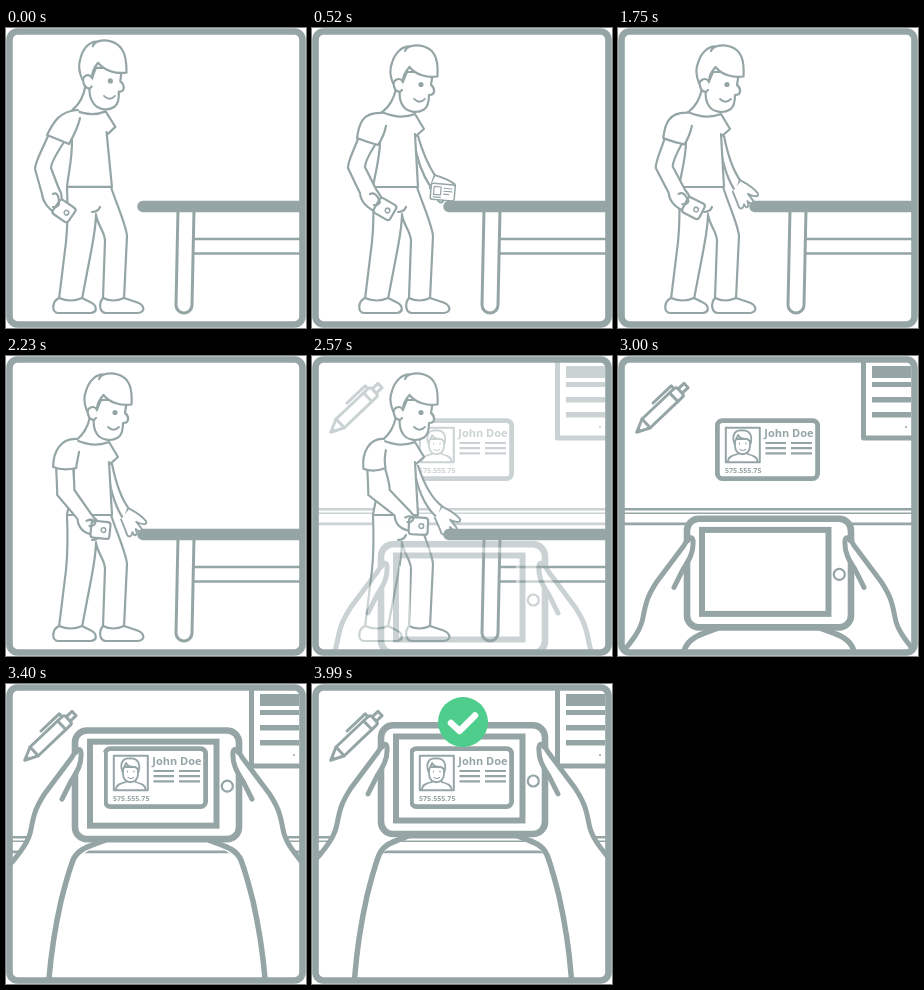
Write an HTML page that moves like this. It is 300 by 300 pixels and loops after 4.65 s.

```html
<!DOCTYPE html>
<html lang="en">
<head>
<meta charset="utf-8">
<title>Scan the card</title>
<style>
html, body { margin: 0; width: 100%; height: 100%; overflow: hidden; background: #fff; }
svg { display: block; width: 100vw; height: 100vh; }
text { font-family: "Open Sans", "Noto Sans", sans-serif; font-weight: 700; fill: #95a5a6; stroke: none; }
.ink { fill: #95a5a6; stroke: none; }
.line { fill: none; }
</style>
</head>
<body>
<svg viewBox="0 0 300 300" fill="#fff" stroke="#95a5a6" stroke-width="2.2" stroke-linecap="round" stroke-linejoin="round">
  <defs><clipPath id="stage"><rect x="5" y="5" width="289.5" height="289" rx="6"/></clipPath></defs>
  <rect width="300" height="300" stroke="none"/>
  <g clip-path="url(#stage)">

    <g id="desk">
      <path class="line" stroke-width="2.4" d="M0 153.300H300"/>
      <path class="line" stroke-width="1.400" d="M0 157.200H300"/>
      <path class="line" stroke-width="2.800" d="M0 167.800H300"/>
      <g transform="translate(18 77) rotate(-43.5)" stroke-width="3">
        <path d="M1 0L14 -6H58Q61 -6 61 -3V3Q61 6 58 6H14Z"/>
        <path class="line" d="M14 -6V6M52 -6V6"/>
        <path d="M61 -3H69V3H61Z"/>
        <path class="line" d="M58 -6V-10H33"/>
        <path class="ink" d="M0 0L6 -3V3Z"/>
      </g>
      <path d="M245.500 0V82H300" stroke-width="5"/>
      <path class="ink" d="M254 10H293V22H254ZM254 26H293V31H254ZM254 41H293V46.500H254ZM254 56H293V61.500H254Z"/>
      <circle class="ink" cx="288" cy="71" r="1"/>
      <rect x="99.400" y="64.600" width="100.200" height="58" rx="5" stroke-width="4.800"/>
      <rect x="107.800" y="71.800" width="34" height="34.500" stroke-width="2"/>
      <g stroke-width="1.800">
        <path class="line" d="M110 105.500C110 101 114 99.500 120 98V95M139.500 105.500C139.500 101 135 99.500 129.500 98V95"/>
        <path d="M117 83V90C117 101 132 101 132 90V83Z"/>
        <path d="M116.500 88C113 78 118 73.500 124 74.500C131 73.500 135 79 132.500 88C132 85 131 83 128 83C124 83 121 81 120 79C119 82 117 84 116.500 88Z"/>
        <path class="line" stroke-width="1.200" d="M121.500 87V88M128 87V88M122 93.500Q125 95.500 127.500 93.500"/>
      </g>
      <text x="146.300" y="81.300" font-size="11">John Doe</text>
      <text x="107" y="116.700" font-size="7.100">575.555.75</text>
      <path class="line" stroke-width="2.200" stroke-linecap="butt" d="M147.500 87H168M147.500 92.200H168M147.500 97.400H168M173 87H194M173 92.200H194M173 97.400H194"/>
    </g>

    <g id="room">
      <g id="reach">
        <path id="foreArm"/>
        <g id="palm">
          <path d="M1 -6C8 -5 16 -3 21 0C24 3 19 5 12 4L20 9C23 12 20 14 17 12L14 11C19 17 15 19 12 15C13 21 9 22 6 17L-3 7" stroke-width="1.900"/>
        </g>
        <g id="idCard" stroke-width="1.500">
          <rect x="-12" y="-8" width="24" height="16" rx="2"/>
          <rect x="-9" y="-5" width="7" height="8" stroke-width="1.200"/>
          <path class="line" stroke-width="1.200" d="M1 -4H9M1 -1H9M1 2H6M-9 5.500H-2"/>
        </g>
      </g>
      <path d="M61 159C62 184 62 195 60 214L53 272H76L85 215L90 186L99 211L97 272H118L121 208L105 159Z" stroke="none"/>
      <path class="line" d="M61 159C62 184 62 195 60 214L53 271M76 271L85 224C88 208 90 198 90 186M105 159C112 180 120 197 121 208L118 271M97 270L99 213C99 204 92 198 90 187M86 184Q92 184 94 179"/>
      <path d="M53 270C45 274 46 285 52 285H85C92 284 91 277 84 274L76 270Q65 275 53 270Z"/>
      <path d="M97 270C92 276 94 285 100 285H132C140 284 139 277 130 274L118 270Q107 275 97 270Z"/>
      <g id="torso">
        <path d="M70 84C76 81 80 76 83 62L100 80L103 87L112 101L104 108C105 128 106 144 106 159H61C63 142 67 128 68 112Z" stroke="none"/>
        <path class="line" d="M68 113C68 130 63 146 61 159H106L103 106M70 84Q88 92 103 86L112 101L104 108"/>
        <path class="line" d="M84 61C82 70 78 78 71 83.500"/>
        <path d="M88 60C87 68 88 74 91 78C95 84 105 86 112 81.500C116 79 117 74 117 67C124 67 123 60 119 57L121 44H95Z"/>
        <path d="M80 55C78 48 78 40 80 35C83 25 90 18 98 18.500C106 16 117 18 122 26C126 32 126 40 125.500 48.500C115 50 104 47 97.500 39C93 44 91 48 91 54Z" stroke="none"/>
        <path class="line" d="M81 55C78 48 78 40 80 35C83 25 90 18 98 18.500C106 16 117 18 122 26C126 32 126 40 125.500 48.500C115 50 104 47 97.500 39C93 44 91 48 91 53M98 18.500Q94 20 93 23"/>
        <path d="M91 54C88 48 80 52 82 58C83 64 88 65 90 62"/>
        <circle class="ink" cx="109" cy="56.500" r="2.600"/>
        <path class="line" stroke-width="1.800" d="M102 71C106 75 110 74 113 71"/>
      </g>
      <path id="backArm"/>
      <g id="phone">
        <rect x="-9.500" y="-8.500" width="19" height="17" rx="3"/>
        <circle cx="3" cy="0" r="2.300" stroke-width="1.500"/>
      </g>
      <path id="fingers" class="line"/>
      <path id="sleeve"/>
      <path class="line" stroke-width="2.500" d="M187 211H300M187 225.500H300"/>
      <path d="M172 182L170 277A8 8 0 0 0 186 277L188 182" stroke-width="3"/>
      <path d="M137 178.500H306" stroke-width="11.500"/>
    </g>

    <g id="tablet">
      <g id="hands"></g>
      <path fill-rule="evenodd" d="M82 3H220Q234 3 234 17V98Q234 112 220 112H82Q68 112 68 98V17Q68 3 82 3ZM84 14.500V98.500H210.500V14.500Z" stroke="none"/>
      <rect class="line" x="69" y="3.300" width="164" height="108.700" rx="12" stroke-width="6.600"/>
      <rect class="line" x="84" y="14.500" width="126.500" height="84" stroke-width="6" stroke-linejoin="miter"/>
      <circle cx="221.300" cy="59" r="5.500" stroke-width="2.200"/>
      <g id="thumbs"></g>
    </g>

    <g id="badge" stroke="none">
      <circle cx="151" cy="38" r="25" fill="#4ecd8c"/>
      <path d="M139 39L147.500 47L163 31.500" fill="none" stroke="#fff" stroke-width="6.500"/>
    </g>
  </g>
  <rect class="line" x="3.500" y="3.500" width="293" height="293" rx="8" stroke-width="6.600"/>
</svg>
<script>
const LOOP = 4650;
const $ = id => document.getElementById(id);
const set = (id, name, value) => $(id).setAttribute(name, value);
const mix = (a, b, k) => a + (b - a) * k;
const blend = (a, b, k) => a.map((v, i) => mix(v, b[i], k));
const along = (poses, steps) => steps.reduce((pose, k, i) => blend(pose, poses[i + 1], k), poses[0]);
const part = (t, from, to) => Math.min(1, Math.max(0, (t - from) / (to - from)));
const ease = p => p < .5 ? 2 * p * p : 1 - 2 * (1 - p) * (1 - p);
const swing = (t, from, to) => ease(part(t, from, to));

// outer edge: top, elbow, wrist; inner edge: top, elbow, wrist; phone x, y, angle
const ARM = [
  [42, 108, 29, 138, 38, 172, 58, 114, 45, 138, 53, 161, 58, 183, 35],
  [46, 111, 36, 137, 50, 171, 63, 117, 53, 137, 64, 161, 73, 181, 30],
  [50, 112, 51, 136, 73, 169, 67, 112, 68, 132, 86, 160, 94, 174, 6],
  [56, 112, 57, 136, 86, 165, 74, 113, 79, 132, 101, 156, 108, 169.5, 2]
];
const SLEEVE = [
  [72, 82, 53, 83, 47, 95, 41, 107, 63, 116, 74, 90],
  [70, 85, 50, 84, 47, 96, 45, 110, 66, 117, 74, 98],
  [71, 83, 55, 82, 47, 95, 47, 111, 70, 112, 73, 96],
  [72, 83, 58, 82, 50, 96, 52, 113, 74, 112, 74, 94]
];
// upper edge, lower edge, palm x, y, angle
const REACH = [
  [106, 108, 113, 132, 123, 147, 102, 112, 106, 140, 119, 159, 122, 153, 8],
  [106, 110, 114, 138, 125, 151, 102, 116, 107, 147, 120, 163, 123, 157, 4],
  [106, 108, 112, 138, 122, 152, 102, 118, 107, 149, 118, 164, 120, 158, 20],
  [106, 110, 116, 139, 131, 150, 103, 118, 110, 149, 127, 162, 129, 156, 18]
];

const mirror = 'transform="translate(302 0) scale(-1 1)"';
const both = shape => shape + `<g ${mirror}>${shape}</g>`;
const edge = 'M75 25C74 19 69 24 66 30L39 66C30 80 28 86 25 102C23 114 15 124 7 134';
$('hands').innerHTML = both(
  `<path stroke="none" d="${edge}L-30 170V265H42C44 220 54 170 67 133L98 114V25Z"/>` +
  '<path class="line" stroke-width="5.500" d="M99 113C84 119 72 121 67 133C62 146 59 158 55 174C48 205 44 232 42 265"/>');
$('thumbs').innerHTML = both(
  `<path stroke="none" d="M75 25C76 38 70 46 65 54L56 72L39 66L66 30Z"/>` +
  `<path class="line" stroke-width="5" d="${edge}L-20 160M75 25C76 38 70 46 65 54L56 72"/>`);

function drawBackArm(steps) {
  const [ax, ay, bx, by, cx, cy, dx, dy, ex, ey, fx, fy, px, py, turn] = along(ARM, steps);
  set('backArm', 'd', `M${ax} ${ay}C${mix(ax, bx, .6)} ${mix(ay, by, .6)} ${bx} ${by - 4} ${bx} ${by + 3}L${cx - 2} ${cy - 6}` +
    `C${cx - 1} ${cy + 4} ${cx + 6} ${cy + 9} ${px - 6} ${py + 5}L${px - 2} ${py - 8}` +
    `C${fx + 3} ${fy + 3} ${fx + 1} ${fy + 2} ${fx} ${fy}L${ex} ${ey + 2}Q${ex} ${ey - 4} ${dx} ${dy}`);
  set('phone', 'transform', `translate(${px} ${py}) rotate(${turn})`);
  set('fingers', 'd', `M${fx - 6} ${fy + 5}Q${fx} ${fy + 2} ${px - 5} ${py - 7}Q${px - 7} ${py - 3} ${px - 11} ${py - 4}`);
  const s = along(SLEEVE, steps);
  set('sleeve', 'd', `M${s[0]} ${s[1]}C${s[2]} ${s[3]} ${s[4]} ${s[5]} ${s[6]} ${s[7]}Q${s[6] + 10} ${s[7] + 4} ${s[8]} ${s[9]}Q${s[10] - 2} ${s[11] + 10} ${s[10]} ${s[11]}`);
}

function drawReach(lean, drop, back, lift) {
  const p = along(REACH, [drop, back, lift]);
  set('foreArm', 'd', `M${p[0]} ${p[1]}Q${p[2]} ${p[3]} ${p[4]} ${p[5]}L${p[10]} ${p[11]}Q${p[8]} ${p[9]} ${p[6]} ${p[7]}`);
  set('palm', 'transform', `translate(${p[12]} ${p[13]}) rotate(${p[14]})`);
  set('reach', 'transform', `rotate(${mix(38, 0, lean)} 96 95)`);
  const flat = mix(mix(1, .42, drop), 0, back);
  set('idCard', 'transform', `translate(${mix(131, 145, drop)} ${mix(mix(164, 170.5, drop), 174, back)}) rotate(${mix(5, 0, drop)}) scale(1 ${flat})`);
  set('idCard', 'opacity', back < 1 ? 1 : 0);
}

function draw(t) {
  const lean = swing(t, 0, 550);
  const lift = swing(t, 2160, 2700);
  const k = 1 - lean;
  set('torso', 'transform', `matrix(1 0 ${.045 * k} ${1 + .035 * k} ${-7.2 * k} ${-5.6 * k})`);
  drawBackArm([lean, swing(t, 1620, 2160), lift]);
  drawReach(lean, swing(t, 550, 1080), swing(t, 1080, 1620), lift);

  const fade = part(t, 2160, 2690);
  const shown = Math.pow(fade, 2.7);
  set('desk', 'opacity', shown);
  set('tablet', 'opacity', shown);
  set('room', 'opacity', 1 - Math.pow(fade, 14));
  const top = mix(mix(272, 159.5, fade), 38, swing(t, 2990, 3470));
  set('tablet', 'transform', `translate(0 ${top})`);

  const pop = swing(t, 3555, 3990);
  set('badge', 'opacity', pop);
  set('badge', 'transform', `translate(0 ${mix(17, 0, pop)})`);
}

let start = null;
function tick(now) {
  if (start === null) start = now;
  draw((now - start) % LOOP);
  requestAnimationFrame(tick);
}
draw(0);
requestAnimationFrame(tick);
</script>
</body>
</html>
```
